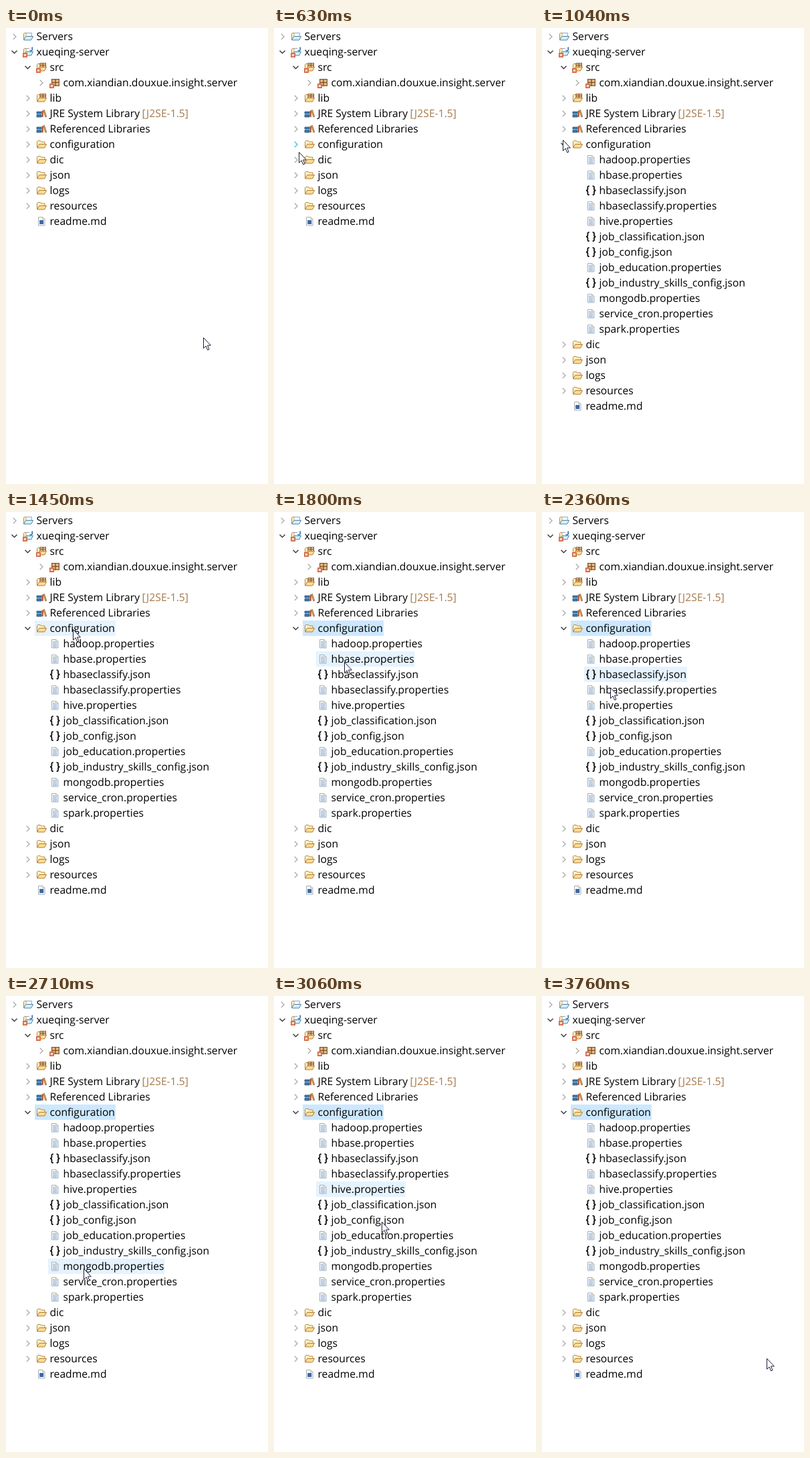
An HTML page that plays this animation: 392 px wide and 681 px high, repeating every 3.83 s.

```html
<!DOCTYPE html>
<html lang="en">
<head>
<meta charset="utf-8">
<title>Project tree</title>
<style>
  html, body { margin: 0; width: 100%; height: 100%; overflow: hidden; background: #fff; }
  svg { display: block; width: 392px; height: 681px; }
  text { font: 15.7px "Open Sans", "Noto Sans", sans-serif; fill: #000; text-rendering: geometricPrecision; }
  .note { fill: #a5794b; }
  .chev { fill: none; }
</style>
</head>
<body>
<svg id="stage" viewBox="0 0 392 681">
  <defs>
    <path id="back" d="M1.5 12.5V3.5l1-1h4l1 1.5h5.5v3" fill="#fff0c4" stroke="#b88a45"/>
    <path id="front" d="M1.6 13 4.7 7.5H15.5L12.6 13Z" stroke-linejoin="round"/>
    <g id="folder">
      <use href="#back"/>
      <use href="#front" fill="#fbdc94" stroke="#b27c35"/>
    </g>
    <g id="drawer">
      <use href="#back"/>
      <path d="M5 6.5V2.5h8.5v4" fill="#fff" stroke="#96a6b4"/>
      <use href="#front" fill="#d5effb" stroke="#4d84a6"/>
    </g>
    <g id="error">
      <rect y="9" width="7" height="7" fill="#d2693f"/>
      <path d="M1.8 10.8l3.4 3.4M5.2 10.8l-3.4 3.4" stroke="#fff" stroke-width="1.2"/>
    </g>
    <g id="project">
      <use href="#drawer"/>
      <path d="M10 0h6v7h-6z" fill="#fff"/>
      <path d="M14.2.5V4q0 2-1.7 2T10.8 5" fill="none" stroke="#2865a8" stroke-width="1.5"/>
      <use href="#error"/>
    </g>
    <g id="grid">
      <rect x=".5" y=".5" width="9" height="8" fill="#e4bd8d" stroke="#855125"/>
      <path d="M5 0v9M0 4.5h10" stroke="#855125" stroke-width="1.2"/>
    </g>
    <g id="lib">
      <use href="#back"/>
      <use href="#grid" transform="translate(5.5 1) scale(.95 .8)"/>
      <use href="#front" fill="#fbdc94" stroke="#b27c35"/>
    </g>
    <g id="src">
      <use href="#lib"/>
      <use href="#error"/>
    </g>
    <g id="pack">
      <use href="#grid" transform="translate(3 2) scale(1.2)"/>
      <use href="#error"/>
    </g>
    <g id="books">
      <path d="M1 5h7v3H1zM1 9.5h7V13H1z" fill="#3c76a8" stroke="#285a86" stroke-width=".8"/>
      <path d="M8.5 3.5h2.3V13H8.5z" fill="#a25532"/>
      <path d="M10.7 3l1.8-.7L15.8 12.4l-2 .7Z" fill="#d99a58" stroke="#96602c" stroke-width=".7"/>
    </g>
    <g id="page">
      <path d="M3.5 1.5h6.5l3 3v9.5h-9.5z" fill="#f9fbfe" stroke="#a2aebc"/>
      <path d="M9.8 1.5v3.2h3.2" fill="#e9e2cb" stroke="#b7ad8f" stroke-width=".8"/>
    </g>
    <g id="file">
      <use href="#page"/>
      <path d="M5 4.5h4M5 6.5h6.5M5 8.5h6.5M5 10.5h6.5M5 12.3h6.5" stroke="#7d9fc9" stroke-width=".9"/>
    </g>
    <g id="doc">
      <use href="#page"/>
      <rect x="5.2" y="6" width="6" height="6" fill="#3c68a4"/>
    </g>
    <g id="json" fill="none" stroke="#111" stroke-width="1.8">
      <path id="brace" d="M5.8 1.2Q3.4 1 3.4 2.8V5.5Q3.4 7.5 1 7.7Q3.4 7.9 3.4 9.9V12.6Q3.4 14.4 5.8 14.2"/>
      <use href="#brace" transform="matrix(-1 0 0 1 16.4 0)"/>
    </g>
  </defs>
  <g id="tree"></g>
  <path id="cursor" d="M.5 .5V16.3L4.1 12.9 6.7 18.9 9 17.9 6.5 12H11.4Z" fill="#fff" stroke="#1c1c38"/>
</svg>
<script>
const NS = "http://www.w3.org/2000/svg";
const LOOP = 3830, TICK = 70, STEP = 23, INDENT = 20;
const OPEN_AT = 840, PICK_AT = 1590;
const tree = document.getElementById("tree");
const cursor = document.getElementById("cursor");

const configs = ("hadoop.properties hbase.properties hbaseclassify.json hbaseclassify.properties " +
  "hive.properties job_classification.json job_config.json job_education.properties " +
  "job_industry_skills_config.json mongodb.properties service_cron.properties spark.properties").split(" ");

// level, icon, label, arrow (">" closed, "v" open), trailing note
const items = [
  [0, "drawer", "Servers", ">"],
  [0, "project", "xueqing-server", "v"],
  [1, "src", "src", "v"],
  [2, "pack", "com.xiandian.douxue.insight.server", ">"],
  [1, "lib", "lib", ">"],
  [1, "books", "JRE System Library", ">", "[J2SE-1.5]"],
  [1, "books", "Referenced Libraries", ">"],
  [1, "folder", "configuration", ">"],
  ...configs.map(s => [2, s.endsWith("json") ? "json" : "file", s]),
  ...["dic", "json", "logs", "resources"].map(s => [1, "folder", s, ">"]),
  [1, "doc", "readme.md"]
];
const FOLDER = items.findIndex(item => item[2] === "configuration");

// Where the pointer turns or rests: ms, x, y
const stops = [
  [0, 295, 462], [560, 37, 185], [630, 37, 185], [770, 21, 164], [1170, 34, 168],
  [1450, 100, 175], [1660, 103, 180], [1730, 104, 212], [1800, 105, 224], [2080, 112, 452],
  [2220, 99, 228], [2710, 116, 407], [2850, 80, 240], [3410, 341, 553], [3760, 336, 541]
];

function add(parent, tag, attrs, text) {
  const el = document.createElementNS(NS, tag);
  for (const k in attrs) el.setAttribute(k, attrs[k]);
  if (text) el.textContent = text;
  parent.appendChild(el);
  return el;
}

const rows = items.map(([level, icon, label, arrow, note]) => {
  const dx = INDENT * level, g = add(tree, "g", {});
  const bg = add(g, "rect", { x: 23 + dx, y: 1, height: STEP });
  const chev = arrow && add(g, "path", { class: "chev" });
  add(g, "use", { href: "#" + icon, x: 25 + dx, y: 5 });
  const name = add(g, "text", { x: 45.5 + dx, y: 18 }, label);
  let end = 46.5 + dx + name.getComputedTextLength();
  if (note) {
    const extra = add(g, "text", { x: end + 2.5, y: 18, class: "note" }, note);
    end += 3.5 + extra.getComputedTextLength();
  }
  bg.setAttribute("width", end - 23 - dx);
  return { g, bg, chev, dx, end, arrow };
});

// The screen updates once per tick, with two longer holds after 910 ms.
function snap(t) {
  if (t < 910) return Math.floor(t / TICK) * TICK;
  if (t < 1170) return t < 1040 ? 910 : 1040;
  return 1170 + Math.floor((t - 1170) / TICK) * TICK;
}

const ease = k => (1 - Math.cos(Math.PI * k)) / 2;

function tipAt(t) {
  const i = stops.findIndex(s => s[0] > t);
  const [t1, x1, y1] = stops.at(i);
  if (i < 1) return [x1, y1];
  const [t0, x0, y0] = stops[i - 1];
  const k = ease((t - t0) / (t1 - t0));
  return [Math.round(x0 + (x1 - x0) * k), Math.round(y0 + (y1 - y0) * k)];
}

function drawArrow(row, down, lit) {
  const x = row.dx;
  row.chev.setAttribute("d", down
    ? `M${x + 8.5} 10.7l4 4 4-4`
    : `M${x + 10.8} 8.7l4.2 4.2-4.2 4.2`);
  row.chev.setAttribute("stroke", lit ? "#1cc4f7" : down ? "#404040" : "#a6a6a6");
  row.chev.setAttribute("stroke-width", down ? 1.5 : 1.3);
}

function draw(time) {
  const t = snap(time), open = t >= OPEN_AT;
  const [hx, hy] = tipAt(snap(t - 1)); // hover trails the pointer by one tick
  const hot = Math.floor((hy - 1.5) / STEP);
  let line = 0;
  rows.forEach((row, i) => {
    const hidden = !open && i > FOLDER && i <= FOLDER + configs.length;
    row.g.style.display = hidden ? "none" : "";
    if (hidden) return;
    const over = line === hot;
    row.g.setAttribute("transform", `translate(0 ${line++ * STEP})`);
    const picked = i === FOLDER && t >= PICK_AT;
    const hover = over && hx >= 23 + row.dx && hx <= row.end;
    row.bg.setAttribute("fill", picked ? "#cce8ff" : hover ? "#e5f3ff" : "none");
    if (row.chev) {
      const down = row.arrow === "v" || (i === FOLDER && open);
      drawArrow(row, down, over && Math.abs(hx - 13 - row.dx) <= 6);
    }
  });
  cursor.setAttribute("transform", `translate(${tipAt(t).join(" ")})`);
}

const start = performance.now();
function tick(now) {
  draw(Math.max(0, now - start) % LOOP);
  requestAnimationFrame(tick);
}
draw(0);
requestAnimationFrame(tick);
</script>
</body>
</html>
```
